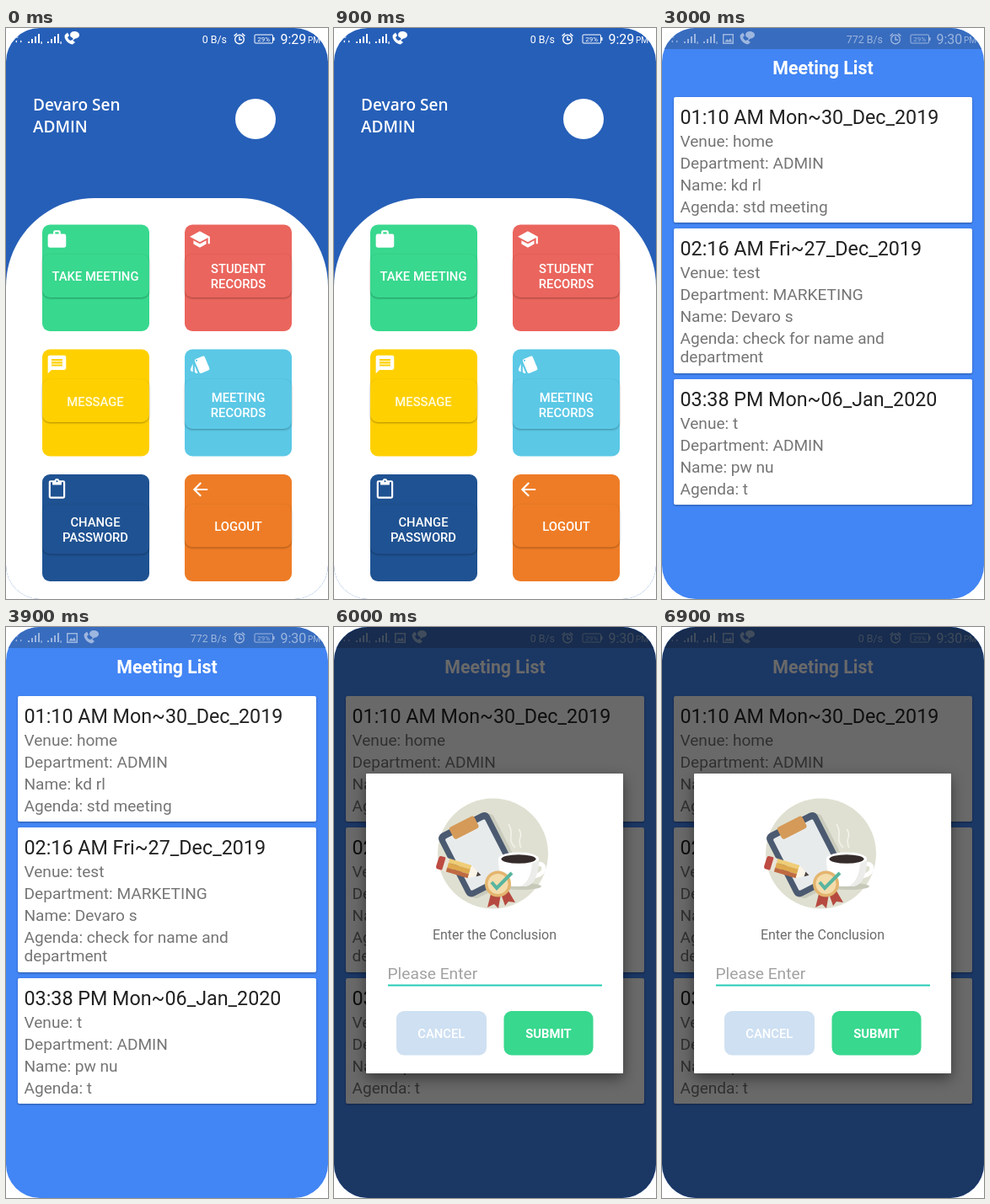
An HTML page for the animation above (7500 ms loop, 382 px wide and 678 px high).

```html
<!DOCTYPE html>
<html lang="en">
<head>
<meta charset="utf-8">
<title>Meeting app walkthrough</title>
<style>
html, body { margin: 0; width: 100%; height: 100%; overflow: hidden; background: #fff; }
svg { display: block; width: 100vw; height: 100vh; }
text { font-family: Roboto, sans-serif; }
.mid { text-anchor: middle; }
.end { text-anchor: end; }

/* Screens switch hard, so every timeline is stepped. */
.home, .tap, .list, .quiet, .busy, .press, .dialog { animation: 7.5s step-end infinite; }
.home { animation-name: home; }
.tap { animation-name: tap; }
.list { animation-name: list; }
.busy { animation-name: busy; }
.press { animation-name: press; }
.dialog, .quiet { animation-name: dialog; }
@keyframes home { 0% { visibility: visible } 40%, 100% { visibility: hidden } }
@keyframes tap { 0%, 40%, 100% { visibility: hidden } 20% { visibility: visible } }
@keyframes list { 0% { visibility: hidden } 40%, 100% { visibility: visible } }
@keyframes busy { 0%, 80%, 100% { visibility: hidden } 40% { visibility: visible } }
@keyframes press { 0%, 80%, 100% { visibility: hidden } 60% { visibility: visible } }
@keyframes dialog { 0% { visibility: hidden } 80%, 100% { visibility: visible } }

.status { fill: #fff; stroke: none; }
.speed { font-size: 12.4px; }
.clock { font-size: 16px; }
.user { font: 600 19px "Open Sans", sans-serif; fill: #fff; }
.tile { font-size: 14.8px; font-weight: 500; fill: #fff; text-anchor: middle; }
.lift { filter: drop-shadow(0 1px 1.2px rgba(0, 0, 0, .32)); }
.icon { fill: #fff; }
.title { font-size: 21.3px; font-weight: 700; fill: #fff; }
.head { font-size: 23.3px; fill: #212121; }
.line { font-size: 19.1px; fill: #757575; }
.note {
  font-size: 35px; font-style: italic; font-weight: 500; letter-spacing: -1.15px;
  fill: #f60808; stroke: #160000; stroke-width: 2.2px; stroke-linejoin: round; paint-order: stroke;
  text-anchor: middle; filter: drop-shadow(2px 3px 1px rgba(0, 0, 0, .75));
}
.panel { filter: drop-shadow(0 6px 8px rgba(0, 0, 0, .45)); }
</style>
</head>
<body>
<svg viewBox="0 0 382 678" preserveAspectRatio="none">
<defs>
  <clipPath id="screen"><rect width="382" height="678" rx="40"/></clipPath>

  <g id="bars">
    <path d="M0 18v-2h2v2zM4 18v-5h2v5zM8 18v-8h2v8zM12 18v-11h2v11z"/>
    <path d="M15.5 16h1.2v3h-1.2z"/>
  </g>
  <g id="call">
    <path d="M1 8c-2 4 3 11 9 11.500l3-2.500-3.500-3-2 1c-2-1-3-2.500-3.500-4l2-2-2-3.500z"/>
    <path d="M12 4c3.500 0 6 1.800 6 4.300s-2.500 4.200-5 4.200l-3 2.500.5-3c-2-.7-3.500-2-3.500-3.700C7 5.800 9 4 12 4z"/>
  </g>
  <g id="right">
    <g fill="none" stroke="#fff" stroke-width="1.4">
      <circle cx="277" cy="13.500" r="5.300"/>
      <path d="M277 10v4h3M270.500 9.500l3.500-3M283.500 9.500l-3.500-3"/>
      <rect x="295" y="8" width="21.500" height="10" rx="1" stroke-width="1"/>
    </g>
    <path d="M317 11h1.500v4H317z"/>
    <text class="mid" x="305.800" y="16" font-size="8">29%</text>
    <text x="358" y="18" font-size="10">PM</text>
  </g>
  <g id="left">
    <text x="10" y="12" font-size="7">G</text>
    <path d="M11 16l2-1.500v3zM19 16l-2-1.500v3z"/>
    <use href="#bars" x="26"/><use href="#bars" x="49"/>
  </g>
  <path id="photo" d="M72 7h13v12H72zm1.500 1.500v9h10v-9zM74.500 16.500l2.500-3.500 2 2 2-3 2 4.500z" fill-rule="evenodd"/>

  <g id="hand" stroke="#551d0d" stroke-width="4.600" stroke-linecap="round" stroke-linejoin="round">
    <path d="M254 465C253 432 298 432 297 465" fill="none"/>
    <path id="palm" fill="#f9ca8e" d="M267 514V461a8.500 8.500 0 0 1 17 0V487c1-8 19-8 20 1c2-7 18-6 20 3c3-7 19-4 19 5V511C343 530 332 538 328 552C322 562 310 565 297 565C280 565 268 558 262 548C256 536 247 521 238 506C235 497 244 490 253 496C259 501 262 508 267 514Z"/>
    <path d="M339 497V511C339 528 328 537 324 549C317 560 294 563 281 557C315 553 324 532 331 513Z" fill="#e9ad70" stroke="none"/>
    <path d="M284 486v20M304 488v18M324 491v15" fill="none" stroke-width="4"/>
  </g>
</defs>

<g clip-path="url(#screen)">
  <g class="home">
    <rect width="382" height="678" fill="#265fb8"/>
    <path d="M0 307C0 249 47 202 105 202H277C335 202 382 249 382 307V678H0Z" fill="#fff"/>
    <g class="status">
      <use href="#left"/><use href="#call" x="69"/><use href="#right"/>
      <text class="speed end" x="262" y="17.500">0 B/s</text>
      <text class="clock" x="325.500" y="18.500">9:29</text>
    </g>
    <text class="user" x="32" y="98">Devaro Sen</text>
    <text class="user" x="32" y="124">ADMIN</text>
    <circle cx="296" cy="108" r="24" fill="#fff"/>

    <g fill="#38d88e">
      <rect x="43" y="233.500" width="127" height="126.500" rx="9"/>
      <rect class="lift" x="43" y="268.500" width="127" height="51.500" rx="9"/>
    </g>
    <g fill="#ea655d">
      <rect x="212" y="233.500" width="127" height="126.500" rx="9"/>
      <rect class="lift" x="212" y="268.500" width="127" height="51.500" rx="9"/>
    </g>
    <g fill="#ffd000">
      <rect x="43" y="381.500" width="127" height="127" rx="9"/>
      <rect class="lift" x="43" y="417" width="127" height="51" rx="9"/>
    </g>
    <g fill="#5bc8e6">
      <rect x="212" y="381.500" width="127" height="127" rx="9"/>
      <rect class="lift" x="212" y="417" width="127" height="59" rx="9"/>
    </g>
    <g fill="#1f5292">
      <rect x="43" y="530" width="127" height="127" rx="9"/>
      <rect class="lift" x="43" y="565.500" width="127" height="59" rx="9"/>
    </g>
    <g fill="#ee7c26">
      <rect x="212" y="530" width="127" height="127" rx="9"/>
      <rect class="lift" x="212" y="565.500" width="127" height="51" rx="9"/>
    </g>

    <g class="icon" fill-rule="evenodd">
      <path transform="translate(47.500 238) scale(1.080)" d="M20 6h-4V4a2 2 0 0 0-2-2h-4a2 2 0 0 0-2 2v2H4a2 2 0 0 0-2 2v11a2 2 0 0 0 2 2h16a2 2 0 0 0 2-2V8a2 2 0 0 0-2-2zm-6 0h-4V4h4z"/>
      <path transform="translate(217 238) scale(1.080)" d="M5 13.200v4L12 21l7-3.800v-4L12 17zM12 3L1 9l11 6 9-4.900V17h2V9z"/>
      <path transform="translate(47.500 386.500) scale(1.080)" d="M20 2H4a2 2 0 0 0-2 2v18l4-4h14a2 2 0 0 0 2-2V4a2 2 0 0 0-2-2zm-2 12H6v-2h12zm0-3H6V9h12zm0-3H6V6h12z"/>
      <g transform="translate(217.500 386.500) scale(1.080)">
        <path d="M2.500 19.700l1.400.5v-9l-2.500 5.800a2 2 0 0 0 1.100 2.700zM5.900 19.700a2 2 0 0 0 2 2h1.400l-3.400-8.300z"/>
        <path d="M22 16L17 4a2 2 0 0 0-2.600-1.100L7.100 6A2 2 0 0 0 6 8.500l5 12a2 2 0 0 0 2.600 1.100l7.300-3A2 2 0 0 0 22 16zM7.900 6.700a1 1 0 1 1 0 2 1 1 0 0 1 0-2z"/>
      </g>
      <path transform="translate(47.500 535) scale(1.080)" d="M19 2h-4.200a3 3 0 0 0-5.600 0H5a2 2 0 0 0-2 2v16a2 2 0 0 0 2 2h14a2 2 0 0 0 2-2V4a2 2 0 0 0-2-2zm-7 0a1 1 0 1 1 0 2 1 1 0 0 1 0-2zm7 18H5V4h2v3h10V4h2z"/>
      <path transform="translate(217.500 535) scale(1.080)" d="M20 11H7.800l5.600-5.600L12 4l-8 8 8 8 1.400-1.400L7.800 13H20z"/>
    </g>

    <g class="tile">
      <text x="106" y="300.300">TAKE MEETING</text>
      <text x="275.500" y="291.300">STUDENT</text><text x="275.500" y="309">RECORDS</text>
      <text x="106" y="448.500" fill="#fffbe0">MESSAGE</text>
      <text x="275.500" y="444">MEETING</text><text x="275.500" y="461.500">RECORDS</text>
      <text x="106" y="592.300">CHANGE</text><text x="106" y="610">PASSWORD</text>
      <text x="275.500" y="597">LOGOUT</text>
    </g>
  </g>

  <use class="tap" href="#hand"/>

  <g class="list">
    <rect width="382" height="678" fill="#4285f4"/>
    <rect width="382" height="25" fill="#386cbe"/>
    <g class="status" opacity=".5">
      <use href="#left"/><use href="#photo"/><use href="#call" x="92"/><use href="#right"/>
      <text class="speed end busy" x="262" y="17.500">772 B/s</text>
      <text class="speed end quiet" x="262" y="17.500">0 B/s</text>
      <text class="clock" x="325.500" y="18.500">9:30</text>
    </g>
    <text class="title mid" x="191" y="55">Meeting List</text>
    <g class="lift" fill="#fff">
      <rect x="14" y="82" width="354" height="149" rx="2"/>
      <rect x="14" y="238" width="354" height="172" rx="2"/>
      <rect x="14" y="417" width="354" height="149" rx="2"/>
    </g>
    <g class="head">
      <text x="21.500" y="114">01:10 AM Mon~30_Dec_2019</text>
      <text x="21.500" y="270">02:16 AM Fri~27_Dec_2019</text>
      <text x="21.500" y="448.500">03:38 PM Mon~06_Jan_2020</text>
    </g>
    <g class="line">
      <text x="21.500" y="141">Venue: home</text>
      <text x="21.500" y="167">Department: ADMIN</text>
      <text x="21.500" y="193">Name: kd rl</text>
      <text x="21.500" y="219">Agenda: std meeting</text>
      <text x="21.500" y="297">Venue: test</text>
      <text x="21.500" y="323">Department: MARKETING</text>
      <text x="21.500" y="349">Name: Devaro s</text>
      <text x="21.500" y="375">Agenda: check for name and</text>
      <text x="21.500" y="397">department</text>
      <text x="21.500" y="476">Venue: t</text>
      <text x="21.500" y="502">Department: ADMIN</text>
      <text x="21.500" y="528">Name: pw nu</text>
      <text x="21.500" y="554">Agenda: t</text>
    </g>
  </g>

  <g class="press">
    <use href="#hand" x="-126" y="-275"/>
    <g class="note">
      <text x="191.500" y="330">Long Press To</text>
      <text x="191.500" y="379">Update The Conclusion</text>
    </g>
  </g>

  <g class="dialog">
    <rect width="382" height="678" fill="#000" opacity=".59"/>
    <rect class="panel" x="38" y="174" width="305" height="356" rx="1" fill="#fff"/>

    <circle cx="188.500" cy="269" r="65.500" fill="#dfe0d1"/>
    <g transform="translate(171 270) rotate(-27)">
      <rect x="-30" y="-38" width="67" height="84" rx="7" fill="#c9cbbd"/>
      <rect x="-34" y="-42" width="67" height="84" rx="7" fill="#4b5a70"/>
      <rect x="-27" y="-34" width="53" height="69" rx="2" fill="#e8ebec"/>
      <rect x="-17" y="-44" width="33" height="16" rx="3" fill="#d59a58"/>
    </g>
    <g transform="translate(123 278) rotate(17)">
      <rect x="0" y="-7" width="9" height="16" rx="3" fill="#bd4b42"/>
      <rect x="8" y="-7" width="5" height="16" fill="#e9e4d8"/>
      <path d="M13-7H40V-2H13z" fill="#efcd78"/>
      <path d="M13-2H40V4H13z" fill="#dfa94e"/>
      <path d="M13 4H40V9H13z" fill="#bf6a42"/>
      <path d="M40-7L54 1L40 9Z" fill="#fbf5e8"/>
      <path d="M49-2L54 1L49 4Z" fill="#4b4240"/>
    </g>
    <path d="M215 262C204 252 215 246 207 234M222 262C216 252 226 248 219 240" fill="none" stroke="#f4f4eb" stroke-width="1.500"/>
    <ellipse cx="222" cy="308" rx="24" ry="4" fill="#c7c9b9"/>
    <path d="M240 282C252 278 253 295 236 296" fill="none" stroke="#fff" stroke-width="5"/>
    <path d="M195 275H243C243 292 238 308 225 308H213C200 308 195 292 195 275Z" fill="#fff"/>
    <path d="M235 280C234 294 230 304 221 308H225C238 308 243 292 243 277Z" fill="#ececea"/>
    <ellipse cx="219" cy="275" rx="24" ry="7.500" fill="#fff"/>
    <ellipse cx="219" cy="275.500" rx="20.500" ry="5.300" fill="#352b2a"/>
    <path d="M187 313L182 333L190 329L195 334L198 317L203 331L207 326L215 327L205 310Z" fill="#b64a40"/>
    <circle cx="194.500" cy="305" r="15.500" fill="#e4b56f"/>
    <circle cx="194.500" cy="305" r="12" fill="#f4dcab"/>
    <path d="M187 303L193 310L211 292" fill="none" stroke="#58b5a0" stroke-width="4"/>

    <text class="mid" x="190.500" y="371" font-size="16" fill="#6c6c6c">Enter the Conclusion</text>
    <text x="63.500" y="418" font-size="19.200" fill="#a2a2a2">Please Enter</text>
    <rect x="64" y="424.500" width="254" height="2" fill="#25cbb5"/>
    <rect x="74" y="456" width="107" height="52.500" rx="9" fill="#cee0f2"/>
    <rect x="201.500" y="456" width="106" height="52.500" rx="9" fill="#38d88e"/>
    <text class="tile" x="127.300" y="488">CANCEL</text>
    <text class="tile" x="254.500" y="488" style="font-weight:700">SUBMIT</text>
  </g>
</g>
</svg>
</body>
</html>
```
